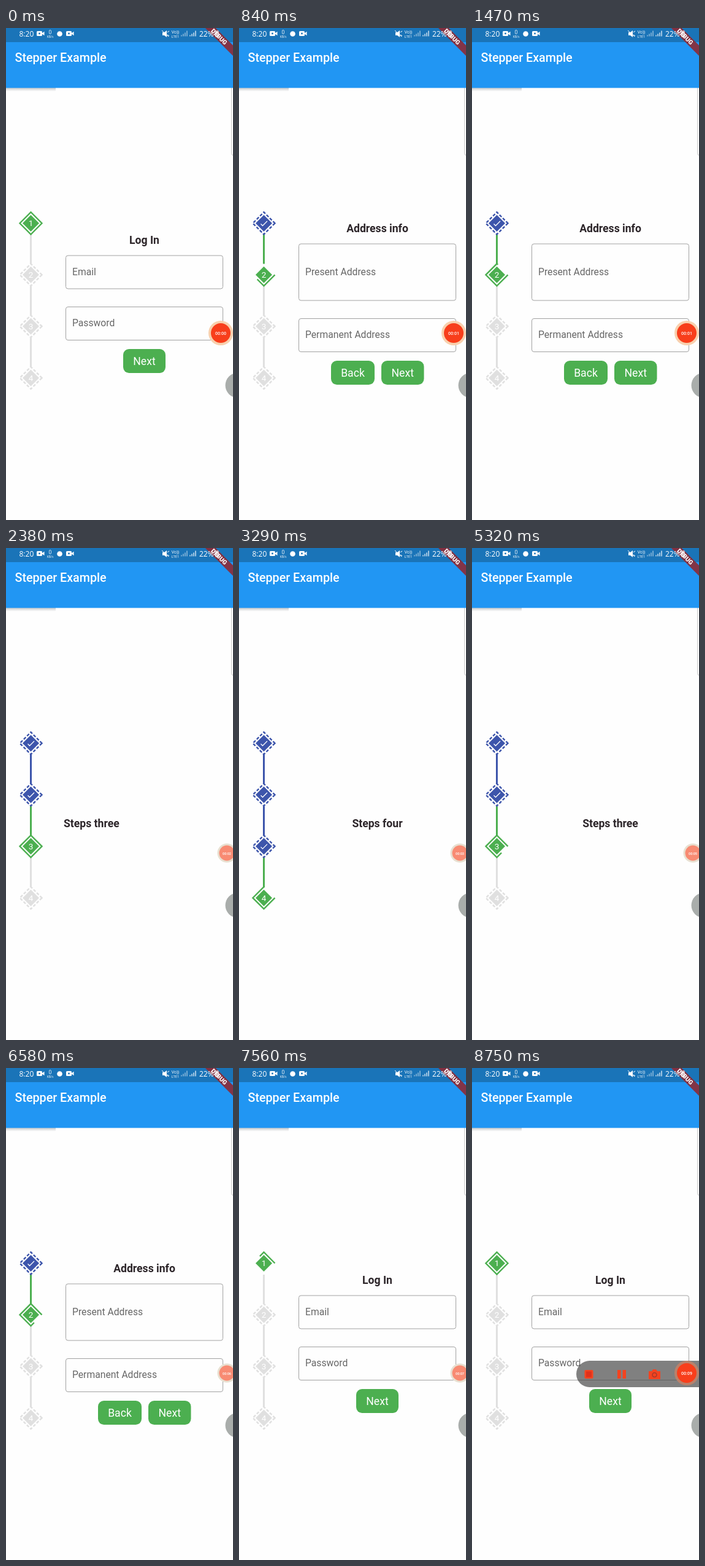
Write an HTML page that moves like this. It is 370 px wide and 800 px high and loops after 8820 ms.

```html
<!DOCTYPE html>
<html lang="en">
<head>
<meta charset="utf-8">
<title>Stepper Example</title>
<style>
  html, body { margin: 0; width: 100%; height: 100%; overflow: hidden; background: #fefefe; }
  svg { display: block; width: 370px; height: 800px; font-family: Roboto, sans-serif; }
  .title { font-size: 17.6px; font-weight: 700; fill: #2c2529; text-anchor: middle; }
  .label { font-size: 15.7px; fill: #676767; }
  .button { font-size: 17.6px; fill: #fff; text-anchor: middle; }
  .field { fill: none; stroke: #a2a2a2; }
  .status { font-family: "Open Sans", sans-serif; fill: #fff; }
</style>
</head>
<body>
<svg viewBox="0 0 370 800">
  <defs>
    <linearGradient id="shade" x2="0" y2="1">
      <stop stop-color="#000" stop-opacity=".22"/>
      <stop offset="1" stop-color="#000" stop-opacity="0"/>
    </linearGradient>
    <clipPath id="view"><rect x="81" y="98" width="289" height="702"/></clipPath>
    <g id="camera">
      <rect width="9" height="8" rx="1.5"/><path d="M8 4L12.5 .8V7.2Z"/>
      <circle cx="4.5" cy="4" r="1.4" fill="#1a74b8"/>
    </g>
    <path id="bars" d="M0 9V7M3 9V5M6 9V3M9 9V0" stroke="#fff" stroke-width="1.4"/>
  </defs>

  <rect width="370" height="800" fill="#fefefe"/>
  <rect y="97" width="81" height="6" fill="url(#shade)"/>
  <g id="steps"></g>
  <g id="pages" clip-path="url(#view)"></g>
  <path d="M371 207H370Q367.5 207 367.5 203V97" fill="#fff" stroke="#c8c8c8"/>

  <rect y="22" width="370" height="75" fill="#2196f3"/>
  <rect y="97" width="370" height="1" fill="#2196f3" opacity=".45"/>
  <rect width="370" height="23" fill="#1a74b8"/>
  <text x="14.5" y="55" font-size="19.7" font-weight="500" fill="#fff">Stepper Example</text>

  <g transform="translate(370 0) rotate(45)">
    <rect x="-50" y="20" width="100" height="12" fill="#8d2a35" opacity=".9"/>
    <text x="-6" y="29.500" font-size="10" font-weight="900" fill="#fff" text-anchor="middle">DEBUG</text>
  </g>
  <g class="status" font-size="12">
    <text x="21.5" y="13.5">8:20</text>
    <use href="#camera" x="50" y="5"/>
    <text x="72" y="10" font-size="8.5" text-anchor="middle">0</text>
    <text x="72" y="16" font-size="5" text-anchor="middle">KB/s</text>
    <circle cx="87.5" cy="9.5" r="4.3"/>
    <use href="#camera" x="98" y="5"/>
    <path d="M255 7H258L262 4V15L258 12H255Z"/>
    <path d="M254 4L265 14M263 7L266 5M263 11L266 13" stroke="#fff"/>
    <text x="276" y="9" font-size="7" text-anchor="middle">Vo))</text>
    <text x="276" y="15.5" font-size="6" text-anchor="middle">LTE1</text>
    <use href="#bars" x="286" y="4.5" opacity=".55"/>
    <use href="#bars" x="300" y="4.5" opacity=".85"/>
    <text x="315" y="13.5">22%</text>
    <rect x="341" y="4" width="6" height="11" rx="1.5" opacity=".6"/>
  </g>

  <circle cx="378" cy="581" r="20.5" fill="#a9adab"/>
  <g id="toolbar">
    <rect x="170" y="476" width="222" height="43" rx="21.5" fill="#464646" fill-opacity=".68"/>
    <g fill="#f4431f">
      <rect x="183.5" y="491" width="14" height="14" rx="2"/>
      <path d="M237 491H242.5V505H237ZM245.5 491H251V505H245.5Z"/>
      <path d="M288 493H293L295 490H300L302 493H307V506H288Z"/>
    </g>
    <rect x="186" y="493.500" width="9" height="9" fill="#e0311c"/>
    <circle cx="297.500" cy="499" r="3.5" fill="none" stroke="#a53a2a" stroke-width="1.5"/>
  </g>
  <g id="bubble">
    <circle id="ring"/><circle id="disc"/>
    <text id="clock" y="2.500" font-size="7" font-weight="500" fill="#fff" text-anchor="middle"></text>
  </g>
</svg>

<script>
const LOOP = 8820, PAGE = 289, REACH = 1700, LINE_LAG = 100;
const GREEN = '#4caf50', BLUE = '#3d55ab', GRAY = '#e0e0e0';

// Page moves: start, duration, from, to
const moves = [
  [300, 300, 0, 1], [1610, 300, 1, 2], [2229, 420, 2, 3],
  [3983, 420, 3, 2], [5810, 420, 2, 1], [6990, 420, 1, 0]
];

const $ = id => document.getElementById(id);
const ramp = (t, start, length) => {
  const u = Math.min(1, Math.max(0, (t - start) / length));
  return u * u * (3 - 2 * u);
};
const mix = (a, b, k) => a + (b - a) * k;
const blend = (a, b, k) => `rgb(${a.map((v, i) => Math.round(mix(v, b[i], k)))})`;

function bounceOut(u) {
  const k = 7.5625;
  if (u >= 1) return 1;
  if (u < 1 / 2.75) return k * u * u;
  if (u < 2 / 2.75) return k * (u - 1.5 / 2.75) ** 2 + .75;
  if (u < 2.5 / 2.75) return k * (u - 2.25 / 2.75) ** 2 + .9375;
  return k * (u - 2.625 / 2.75) ** 2 + .984375;
}

const title = (y, s) => `<text class="title" x="225.5" y="${y}">${s}</text>`;
const field = (y, h, base, s) =>
  `<rect class="field" x="97.5" y="${y}" width="256" height="${h}" rx="3.5"/>
   <text class="label" x="108" y="${base}">${s}</text>`;
const button = (x, y, w, s) =>
  `<rect x="${x}" y="${y}" width="${w}" height="39" rx="9.5" fill="${GREEN}"/>
   <text class="button" x="${x + w / 2}" y="${y + 25.5}">${s}</text>`;

$('pages').innerHTML = [
  title(351, 'Log In') + field(370, 54, 402, 'Email') +
    field(453.5, 54, 485, 'Password') + button(191, 522, 69, 'Next'),
  title(331.5, 'Address info') + field(351, 92, 401.5, 'Present Address') +
    field(472.5, 54, 504, 'Permanent Address') +
    button(150, 541, 71, 'Back') + button(232, 541, 69.5, 'Next'),
  title(453.5, 'Steps three'),
  title(453.5, 'Steps four')
].map(s => `<g>${s}</g>`).join('');

// Most recent move that has passed its halfway point
const lastMove = t => moves.filter(([s, d]) => t >= s + d / 2).pop();
const activeAt = t => (lastMove(t) || moves[5])[3];
const colorOf = (i, active) => i < active ? BLUE : i === active ? GREEN : GRAY;

function border(i, active, t) {
  const attrs = `fill="none" stroke="${colorOf(i, active)}" stroke-width="2.4"`;
  if (i !== active)
    return `<path d="M18 0L0 18L-18 0L0 -18Z" ${attrs} stroke-dasharray="4.8 2.7"/>`;
  const move = lastMove(t);
  const reach = move ? bounceOut((t - move[0] - move[1] / 2) / REACH) : 1;
  const flip = move && move[3] < move[2] ? -1 : 1;
  const dash = reach < .99 ? `stroke-dasharray="${Math.max(2, reach * 100)} 200"` : '';
  return `<path d="M18 0L0 18L-18 0L0 -18Z" pathLength="100" transform="scale(1 ${flip})" ${attrs} ${dash}/>`;
}

function drawSteps(t) {
  const active = activeAt(t), lineActive = activeAt(t - LINE_LAG);
  let out = '';
  for (let i = 0; i < 4; i++) {
    const y = 317.5 + i * 83.8;
    if (i < 3)
      out += `<rect x="39" y="${y + 18.5}" width="3" height="47.5" fill="${colorOf(i + 1, lineActive)}"/>`;
    const mark = i < active
      ? '<path d="M-5 1L-2 4L5.5 -3.5" fill="none" stroke="#fff" stroke-width="1.3"/>'
      : `<text y="4.700" font-size="13.500" fill="#fff" text-anchor="middle">${i + 1}</text>`;
    out += `<g transform="translate(40.5 ${y})">${border(i, active, t)}
      <path d="M13.5 0L0 13.5L-13.5 0L0 -13.5Z" fill="${colorOf(i, active)}"/>${mark}</g>`;
  }
  $('steps').innerHTML = out;
}

function drawPages(t) {
  const pos = moves.reduce((p, [s, d, a, b]) => p + (b - a) * ramp(t, s, d), 0);
  [...$('pages').children].forEach((page, i) =>
    page.setAttribute('transform', `translate(${PAGE * (i - pos)} 0)`));
}

function drawRecorder(t) {
  const dock = ramp(t, 1900, 300) - ramp(t, 8260, 140);
  const open = ramp(t, 8380, 160);
  $('bubble').setAttribute('transform', `translate(${mix(350, 360, dock)} 496)`);
  $('ring').setAttribute('r', mix(20, 15.5, dock));
  $('ring').setAttribute('fill', open > .5 ? '#b9816b' : blend([248, 208, 174], [232, 224, 209], dock));
  $('disc').setAttribute('r', mix(16, 12.5, dock));
  $('disc').setAttribute('fill', blend([248, 62, 27], [248, 139, 115], dock));
  $('clock').setAttribute('font-size', mix(7, 5.5, dock));
  $('clock').textContent = '00:0' + Math.floor((t + 300) / 1000);
  $('toolbar').setAttribute('transform', `translate(${200 * (1 - open)} 0)`);
  $('toolbar').style.display = open ? '' : 'none';
}

function frame() {
  const t = performance.now() % LOOP;
  drawSteps(t);
  drawPages(t);
  drawRecorder(t);
  requestAnimationFrame(frame);
}
frame();
</script>
</body>
</html>
```
